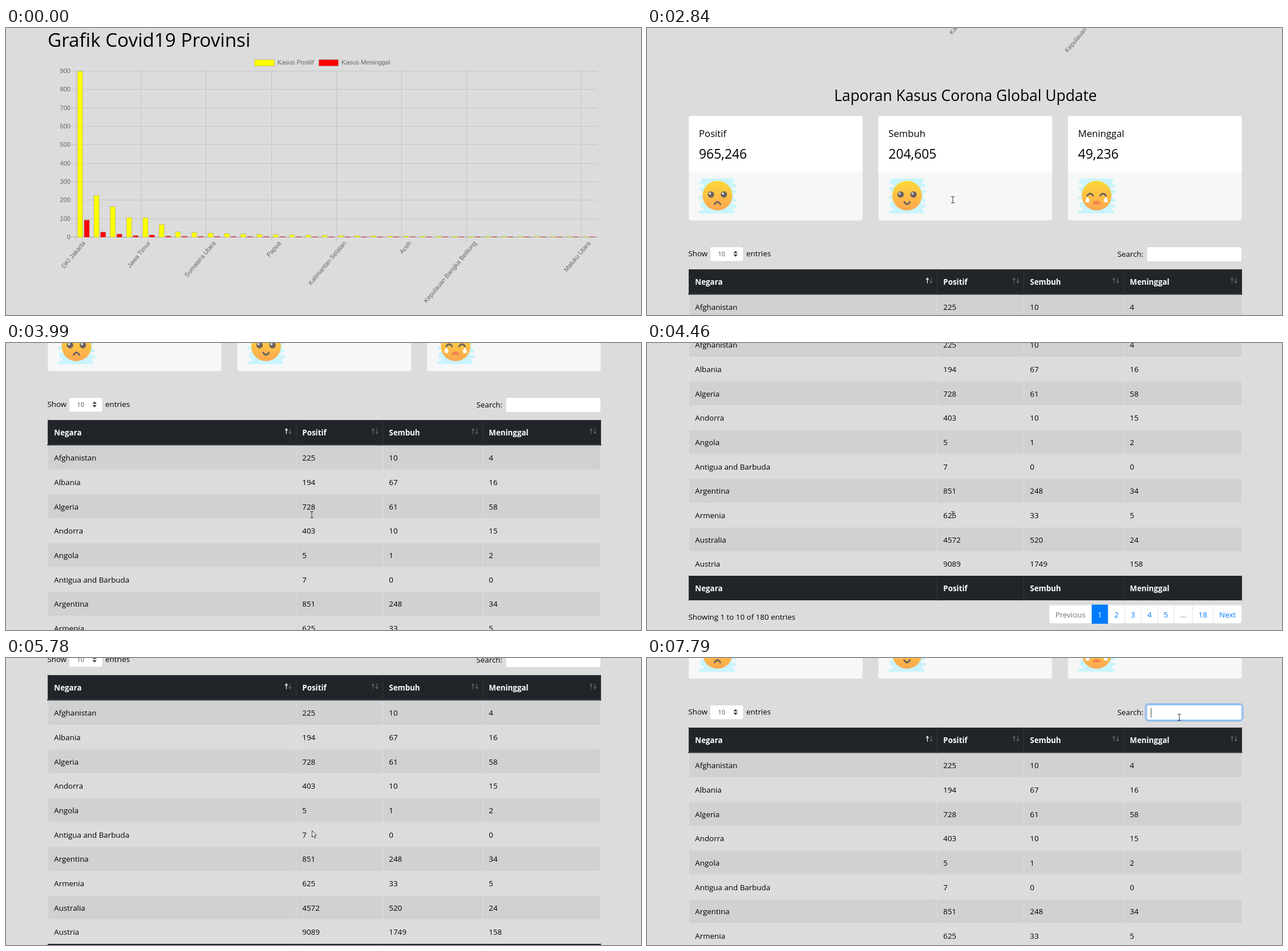
An HTML page that plays this animation: 1113 by 503 pixels, repeating every 8 s.

```html
<!DOCTYPE html>
<html lang="id">
<head>
<meta charset="utf-8">
<title>Grafik Covid19</title>
<style>
  html, body { margin: 0; width: 100%; height: 100%; overflow: hidden; background: #dcdcdc; }
  svg { display: block; width: 1113px; height: 503px; }
  text { font: 13.35px "Open Sans", "Noto Sans", sans-serif; fill: #000; white-space: pre; }
  .title { font-size: 33.2px; }
  .heading { font-size: 26.4px; }
  .label { font-size: 16.7px; }
  .count { font-size: 22.9px; }
  .head { font-weight: 700; fill: #fff; }
  .select { font-size: 11px; fill: #495057; }
  .chart { font: 11.1px "Liberation Sans", Arial, sans-serif; fill: #666; }
  .line { fill: none; stroke-linecap: round; stroke-linejoin: round; }
</style>
</head>
<body>
<svg viewBox="0 0 1113 503">
  <defs>
    <linearGradient id="skin" x1="0" y1="0" x2="0" y2="1">
      <stop offset="0" stop-color="#fed93a"/><stop offset="1" stop-color="#fba650"/>
    </linearGradient>
  </defs>
  <g id="page"></g>
  <path id="arrow" d="M.5 .5V12L3.2 9.6L5 13.6L6.8 12.8L5 8.9H8.2Z" fill="#fff" stroke="#222" stroke-width=".9"/>
  <path id="beam" class="line" d="M-2.5 -5.5H-.8L0 -5L.8 -5.5H2.5M0 -5V5M-2.5 5.5H-.8L0 5L.8 5.5H2.5" stroke="#333"/>
</svg>
<script>
const $ = id => document.getElementById(id);
const page = $('page');

function add(tag, attrs, content) {
  const el = document.createElementNS('http://www.w3.org/2000/svg', tag);
  for (const name in attrs) el.setAttribute(name, attrs[name]);
  if (content !== undefined) el.textContent = content;
  return page.appendChild(el);
}
const rect = (x, y, width, height, fill, more) => add('rect', { x, y, width, height, fill, ...more });
const text = (x, y, content, cls = '', more) => add('text', { x, y, class: cls, ...more }, content);
const path = (d, stroke, width = 1) => add('path', { d, stroke, 'stroke-width': width, class: 'line' });

function drawChart() {
  const left = 122.3, right = 1036.5, top = 75.5, base = 366.5, pitch = 28.57;
  const unit = (base - top) / 900, grid = '#c5c5c5', outline = 'rgba(110,110,110,.35)';
  text(73, 32.5, 'Grafik Covid19 Provinsi', 'title');
  rect(435.5, 55.5, 35, 11, '#ff0', { stroke: outline });
  text(475.5, 64, 'Kasus Positif', 'chart');
  rect(548.5, 55.5, 34, 11, '#f00', { stroke: outline });
  text(588, 64, 'Kasus Meninggal', 'chart');

  for (let value = 0; value <= 900; value += 100) {
    const y = Math.floor(base - value * unit) + .5;
    path(`M114 ${y}H${right}`, value ? grid : '#a4a4a4');
    text(113, y + 3, value, 'chart', { 'text-anchor': 'end' });
  }
  const names = ['DKI Jakarta', 'Jawa Timur', 'Sumatera Utara', 'Papua',
    'Kalimantan Selatan', 'Aceh', 'Kepulauan Bangka Belitung', 'Maluku Utara'];
  names.forEach((name, n) => {
    const x = left + Math.min(n * 4, n < 7 ? 28 : 31) * pitch + (n === 7 ? 3 * pitch : 0) * 1;
    const at = n < 7 ? x : left + 31 * pitch, mid = at + pitch / 2;
    path(`M${Math.floor(at) + .5} ${top}V374`, grid);
    text(mid, 375, name, 'chart',
      { 'text-anchor': 'end', dy: '.35em', transform: `rotate(-50 ${mid} 375)` });
  });

  const bar = (x, value, fill) => {
    const y = base - .7 - value * unit;
    rect(x, y, 9, base - y, fill);
    path(`M${x} ${base}V${y}h9V${base}`, outline);
  };
  const topCases = [897, 223, 163, 104, 103, 66], topDeaths = [90, 25, 14, 6, 9];
  for (let i = 0; i < 32; i++) {
    const x = left + i * pitch + 3.2;
    bar(x, topCases[i] ?? 26 * Math.exp((6 - i) / 7), '#ff0');
    bar(x + 11.6, topDeaths[i] ?? 3 * Math.exp((5 - i) / 4), '#f00');
  }
}

function drawFace(x, y, mood) {
  for (let i = 0; i < 12; i++) {
    const rowY = y - 27.5 + i * 5.1;
    path(`M${x - 26 - 4 * Math.sin(i * 2.4)} ${rowY}H${x + 27 + 4 * Math.sin(i * 3.7)}`, '#c9f4fe', 5.2);
  }
  add('circle', { cx: x, cy: y, r: 26, fill: 'url(#skin)' });
  const ink = '#6c6360';
  for (const side of [-1, 1]) {
    const ex = x + side * 11.3;
    if (mood === 'cry') {
      path(`M${ex - 5} ${y}q5 -7 10 0`, ink, 3);
      add('path', { d: `M${x + side * 16} ${y + 2}q7 10 0 10q-7 0 0 -10`, fill: '#fff' });
    } else {
      add('circle', { cx: ex, cy: y - 2, r: 5.6, fill: ink });
      add('circle', { cx: ex - 1.8, cy: y - 3.8, r: 1.8, fill: '#fff' });
    }
  }
  if (mood === 'cry') add('path', { d: `M${x - 7} ${y + 15}q1 -6 7 -6t7 6z`, fill: '#f5824f' });
  else if (mood === 'sad') path(`M${x - 5} ${y + 15}q5 -8 10 0`, ink, 3);
  else path(`M${x - 5} ${y + 11}q5 8 10 0`, ink, 3);
}

function drawCards(top) {
  [['Positif', '965,246', 'sad'], ['Sembuh', '204,605', 'glad'], ['Meninggal', '49,236', 'cry']]
    .forEach(([label, count, mood], i) => {
      const x = 73.3 + i * 332.3;
      rect(x, top, 304.5, 183, '#f6f7f7', { rx: 4 });
      rect(x, top, 304.5, 97, '#fff', { rx: 4 });
      rect(x, top + 90, 304.5, 7, '#fff');
      text(x + 17.7, top + 36.5, label, 'label');
      text(x + 17.7, top + 75, count, 'count');
      drawFace(x + 50.2, top + 139.5, mood);
    });
}

function drawTable() {
  const columns = [73.5, 508.5, 660.5, 835.5, 1042.5];
  const titles = ['Negara', 'Positif', 'Sembuh', 'Meninggal'];
  const rows = [
    ['Afghanistan', 225, 10, 4], ['Albania', 194, 67, 16], ['Algeria', 728, 61, 58],
    ['Andorra', 403, 10, 15], ['Angola', 5, 1, 2], ['Antigua and Barbuda', 7, 0, 0],
    ['Argentina', 851, 248, 34], ['Armenia', 625, 33, 5], ['Australia', 4572, 520, 24],
    ['Austria', 9089, 1749, 158]];
  const top = 906.3, pitch = 42.67, bottom = top + 10 * pitch;
  const cells = (values, y, cls) => values.forEach((v, i) => text(columns[i] + 10.8, y, v, cls));
  const dividers = (y, end, color) => columns.forEach(x => path(`M${x} ${y}V${end}`, color));

  rows.forEach((row, i) => {
    const y = top + i * pitch;
    rect(73, y, 969.5, pitch, i % 2 ? '#dcdcdc' : '#d1d1d1');
    path(`M73 ${y + .5}H1042.5`, '#dbdddf');
    cells(row, y + 27);
  });
  dividers(top, bottom, '#dbdee0');
  for (const [y, end] of [[862, top], [bottom, 1376]]) {
    rect(73, y, 969.5, end - y, '#212529');
    dividers(y, end, '#32383e');
    cells(titles, y + 27, 'head');
  }
  path(`M73 ${top - 1}H1042.5`, '#32383e', 2);
  columns.slice(1).forEach((edge, i) => {
    const x = edge - 17, y = 877;
    path(`M${x} ${y + 9}v-9m-2 3l2 -3l2 3`, i ? '#62666a' : '#fff', 1.2);
    path(`M${x + 6.5} ${y}v9m-2 -3l2 3l2 -3`, '#62666a', 1.2);
  });
}

function drawPager() {
  const top = 1384, height = 32.5, padding = 10.65;
  text(72.5, 1410.3, 'Showing 1 to 10 of 180 entries');
  rect(705, top, 337.5, height, '#fff', { rx: 4, stroke: '#dee2e6' });
  let x = 705;
  for (const label of ['Previous', '1', '2', '3', '4', '5', '…', '18', 'Next']) {
    const active = label === '1', muted = label === 'Previous' || label === '…';
    const color = active ? '#fff' : muted ? '#6c757d' : '#007bff';
    const item = text(x + padding, 1406, label, '', { style: `fill:${color}` });
    const width = item.getComputedTextLength() + 2 * padding;
    if (active) page.insertBefore(rect(x, top - .5, width, height + 1, '#007bff'), item);
    else if (x > 705) path(`M${x} ${top}v${height}`, '#dee2e6');
    x += width;
  }
}

drawChart();
text(328, 566.8, 'Laporan Kasus Corona Global Update', 'heading');
drawCards(593.3);
text(72.5, 838.6, 'Show');
rect(110.5, 822.5, 58.5, 25.5, '#fff', { rx: 3, stroke: '#d3d7da' });
text(124.5, 839.3, '10', 'select');
add('path', { d: 'M151.5 833.6l3.7 -4.2l3.7 4.2zm0 2.2h7.4l-3.7 4.2z', fill: '#343a40' });
text(174, 838.6, 'entries');
text(824.5, 840, 'Search:');
const glow = rect(874, 820.5, 170, 29.5, 'none', { rx: 5, stroke: '#007bff', 'stroke-width': 3, 'stroke-opacity': .3 });
const field = rect(876, 822.5, 166.5, 26, '#fff', { rx: 3, stroke: '#d3d7da' });
const caret = path('M883.5 828v16', '#444');
drawTable();
drawPager();
text(308, 1490.3, 'Laporan Kasus Corona Indonesia Update', 'heading');
drawCards(1516.8);

// Keys: time in ms, then values
const scrollKeys = [[0, 0], [1780, 0], [1980, 38], [2269, 38], [2270, 92], [2310, 92], [2840, 439],
  [2990, 462], [3290, 462], [3990, 727], [4460, 925], [4990, 925], [5330, 992], [5450, 1010],
  [5780, 832], [5930, 832], [6300, 740]];
const pointerKeys = [[0, 995, 505], [200, 995, 505], [970, 536, 306], [1190, 536, 300],
  [6250, 536, 302], [6710, 889, 152], [7100, 918, 128], [7320, 918, 128], [7480, 933, 104]];

function sample(keys, t) {
  const i = keys.findIndex(key => key[0] > t);
  if (i < 0) return keys[keys.length - 1].slice(1);
  const a = keys[i - 1], b = keys[i], p = (t - a[0]) / (b[0] - a[0]);
  return a.slice(1).map((v, k) => v + (b[k + 1] - v) * p);
}

function draw(now) {
  const t = now % 8000;
  const [scroll] = sample(scrollKeys, t);
  const [x, y] = sample(pointerKeys, t);
  page.setAttribute('transform', `translate(0 ${-Math.round(scroll)})`);

  const overText = (t > 2640 && t < 5000) || t > 7400;
  for (const [id, shown] of [['arrow', !overText], ['beam', overText]]) {
    $(id).setAttribute('transform', `translate(${Math.round(x)} ${Math.round(y)})`);
    $(id).setAttribute('visibility', shown ? 'visible' : 'hidden');
  }
  const focus = Math.min(1, Math.max(0, (t - 7600) / 190));
  glow.setAttribute('opacity', focus);
  field.setAttribute('stroke', focus > .5 ? '#80bdff' : '#d3d7da');
  caret.setAttribute('opacity', focus > 0 ? 1 : 0);
  requestAnimationFrame(draw);
}
requestAnimationFrame(draw);
</script>
</body>
</html>
```
